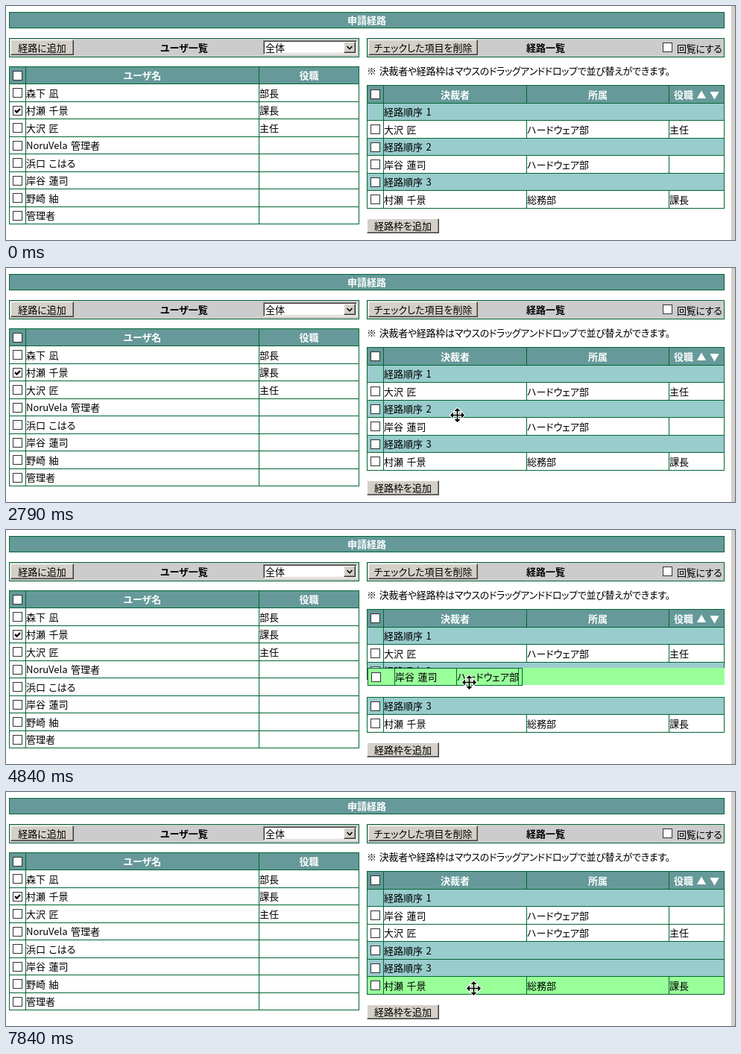
Animation, 978 px wide and 314 px high, one loop 8 s. Source, as an HTML page:

```html
<!DOCTYPE html>
<html lang="ja">
<head>
<meta charset="utf-8">
<title>申請経路</title>
<style>
  html, body { margin: 0; width: 100%; height: 100%; overflow: hidden; background: #fff; }
  #stage {
    position: relative; width: 978px; height: 314px; overflow: hidden; background: #fff; color: #000;
    font: 13px/16px "Noto Sans CJK JP", "Noto Sans CJK", sans-serif;
    font-feature-settings: "palt"; word-spacing: 1.5px; white-space: nowrap;
  }
  #stage * { box-sizing: border-box; }
  #stage div, #stage svg { position: absolute; }
  .edge { background: #d4d0c8; }
  .bar, .row { border: 1px solid #063; }
  .title, .head { background: #699; color: #fff; font-weight: bold; }
  .tools { background: #ccc; }
  .bold { font-weight: bold; }
  .title, .mid { text-align: center; }
  .title { line-height: 20px; }
  .note { letter-spacing: -.3px; }
  .row { background: #fff; }
  .head { background: #699; }
  .group { background: #9cc; }
  .hot, .drag { background: #9f9; }
  .cell { top: 0; bottom: 0; display: flex; align-items: center; border-left: 1px solid #063; }
  .head .cell { justify-content: center; }
  .box { width: 13px; height: 13px; background: #fff; border: 1px solid #333; }
  .row > .box { left: 4px; top: calc(50% - 6.5px); }
  .box svg { left: 1px; top: 1px; }
  .button {
    background: #d4d0c8; border: 1px solid; border-color: #fff #404040 #404040 #fff;
    box-shadow: inset -1px -1px #808080; display: flex; align-items: center; justify-content: center;
  }
  .select {
    background: #fff; border: 1px solid; border-color: #808080 #fff #fff #808080;
    box-shadow: inset 1px 1px #404040, inset -1px -1px #d4d0c8; line-height: 17px; padding-left: 2px;
  }
  .cursor { overflow: visible; }
</style>
</head>
<body>
<div id="stage"></div>
<script>
const stage = document.getElementById("stage");
const LOOP = 8000, STEP = 130;
const DRAG_START = 4840, DRAG_END = 6030, GRAB = 19;

function add(parent, cls, x, y, w, h, text = "") {
  const el = document.createElement("div");
  el.className = cls;
  el.textContent = text;
  const set = (key, v) => { if (v != null) el.style[key] = v + "px"; };
  set("left", x); set("top", y); set("width", w); set("height", h);
  parent.append(el);
  return el;
}

function svg(parent, cls, w, h, paths) {
  parent.insertAdjacentHTML("beforeend",
    `<svg class="${cls}" width="${w}" height="${h}">${paths}</svg>`);
  return parent.lastElementChild;
}

function checkbox(parent, checked, x, y) {
  const box = add(parent, "box", x, y);
  if (checked) svg(box, "", 9, 9, '<path d="M1 4L3.5 6.5 8 2" fill="none" stroke="#000" stroke-width="2.4"/>');
}

// check: null = no checkbox; cols: x of each column line within the row
function row(parent, cls, x, y, w, h, cols, check, texts) {
  const el = add(parent, "row " + cls, x, y, w, h);
  if (check !== null) checkbox(el, check);
  texts.forEach((text, i) => {
    const right = i + 1 < texts.length ? cols[i + 1] : w - 1;
    add(el, "cell", cols[i] - 1, null, right - cols[i], null, text);
  });
  return el;
}

// fixed parts
add(stage, "edge", 973, 0, 5, 314);
add(stage, "bar title", 4, 8, 960, 22, "申請経路");
add(stage, "bar tools", 4, 43, 470, 26);
add(stage, "button", 6, 45, 85, 21, "経路に追加");
add(stage, "bold mid", 179, 48, 120, 16, "ユーザ一覧");
const select = add(stage, "select", 345, 46, 126, 19, "全体");
const drop = add(select, "button", 107, 1, 16, 15);
svg(drop, "", 10, 6, '<path d="M1.5 1L5 4.5 8.5 1" fill="none" stroke="#000" stroke-width="1.6"/>');

add(stage, "bar tools", 484, 43, 480, 26);
add(stage, "button", 486, 45, 147, 21, "チェックした項目を削除");
add(stage, "bold mid", 664, 48, 120, 16, "経路一覧");
checkbox(stage, false, 881, 49);
add(stage, "note", 900, 49, null, 16, "回覧にする");
add(stage, "note", 484, 79, null, 16, "※ 決裁者や経路枠はマウスのドラッグアンドドロップで並び替えができます。");
add(stage, "button", 484, 285, 97, 20, "経路枠を追加");

// user list
const userCols = [22, 335];
row(stage, "head", 4, 81, 470, 24, userCols, false, ["ユーザ名", "役職"]);
[["森下 凪", "部長"], ["村瀬 千景", "課長"], ["大沢 匠", "主任"], ["NoruVela 管理者", ""],
 ["浜口 こはる", ""], ["岸谷 蓮司", ""], ["野崎 紬", ""], ["管理者", ""]].forEach((texts, i) => {
  const line = n => Math.floor(104.5 + 23.5 * n);
  row(stage, "", 4, line(i), 470, line(i + 1) - line(i) + 1, userCols, i === 1, texts);
});

// route list
const cols = [22, 214, 405];
const TOP = 130, PITCH = 23.5;
const slot = i => TOP + PITCH * i;
row(stage, "head", 484, 106, 480, 25, cols, false, ["決裁者", "所属", "役職 ▲ ▼"]);
const group = n => row(stage, "group", 484, 0, 480, 24, cols, n === 1 ? null : false, ["経路順序 " + n]);
const person = (...texts) => row(stage, "person", 484, 0, 480, 24, cols, false, texts);
const rows = {
  1: group(1), 2: group(2), 3: group(3),
  a: person("大沢 匠", "ハードウェア部", "主任"),
  b: person("岸谷 蓮司", "ハードウェア部", ""),
  c: person("村瀬 千景", "総務部", "課長"),
};

const drag = add(stage, "drag", 485, 0, 479, 23);
row(drag, "drag", 0, 0, 208, 24, [36, 119, 202], false, ["岸谷 蓮司", "ハードウェア部", ""]);

const mover = svg(stage, "cursor", 1, 1,
  '<path d="M0-9.5L4-5.5H.8V-.8H5.5V-4L9.5 0 5.5 4V.8H.8V5.5H4L0 9.5-4 5.5H-.8V.8H-5.5V4L-9.5 0-5.5-4V-.8H-.8V-5.5H-4Z" ' +
  'transform="translate(.5 .5)" stroke="#fff" stroke-width="2" paint-order="stroke"/>');
const arrow = svg(stage, "cursor", 1, 1,
  '<path d="M.5.5V16.5L4.5 12.5 7.5 20 10 19 7 11.5H11.5Z" fill="#fff" stroke="#000"/>');

// turning points of the pointer: time, x, y
const path = [
  [1110, 545, 330], [1240, 569, 296], [1630, 606, 248], [1790, 609, 219], [2080, 606, 193],
  [2510, 604, 116], [2630, 604, 172], [2930, 605, 221], [3210, 606, 275], [3360, 607, 268],
  [3750, 617, 233], [3890, 620, 223], [4170, 621, 220], [4710, 621, 220], [4840, 621, 204],
  [5470, 621, 158], [6610, 621, 158], [6740, 621, 171], [7260, 623, 233], [7840, 627, 263],
];

// straight between turning points, in even jumps of about STEP ms
function pointerAt(t) {
  const next = path.findIndex(p => p[0] > t);
  if (next < 1) return path.at(next).slice(1);
  const [t0, x0, y0] = path[next - 1], [t1, x1, y1] = path[next];
  const jumps = Math.max(1, Math.round((t1 - t0) / STEP));
  const k = Math.floor((t - t0) / (t1 - t0) * jumps) / jumps;
  return [Math.round(x0 + (x1 - x0) * k), Math.round(y0 + (y1 - y0) * k)];
}

const show = (el, on) => { el.style.display = on ? "" : "none"; };

function draw(t) {
  const [x, y] = pointerAt(t);
  const dragging = t >= DRAG_START && t < DRAG_END;
  // the gap follows the dragged row until it is dropped
  const gap = t < DRAG_START ? 3 : dragging ? Math.ceil((y - GRAB - TOP) / PITCH) : 1;
  const order = [..."1a23c"];
  order.splice(gap, 0, dragging ? "_" : "b");

  show(rows.b, !dragging);
  order.forEach((key, i) => {
    const el = rows[key];
    if (!el) return;
    // an open gap pulls the rows below it up, as far as the last group
    const lift = dragging && i > gap && i < 4 ? .5 : 0;
    const top = Math.floor(slot(i) - lift), bottom = Math.floor(slot(i + 1) - lift);
    el.style.top = top + "px";
    el.style.height = bottom - top + 1 + "px";
    el.classList.toggle("hot", !dragging && el.classList.contains("person") && y > top && y <= bottom);
  });

  show(drag, dragging);
  drag.style.top = y - GRAB + "px";

  const inside = y > slot(0) && y <= slot(6);
  show(mover, inside);
  show(arrow, !inside);
  for (const el of [mover, arrow]) {
    el.style.left = x + "px";
    el.style.top = y + "px";
  }
}

function tick() {
  draw(performance.now() % LOOP);
  requestAnimationFrame(tick);
}
tick();
</script>
</body>
</html>
```
